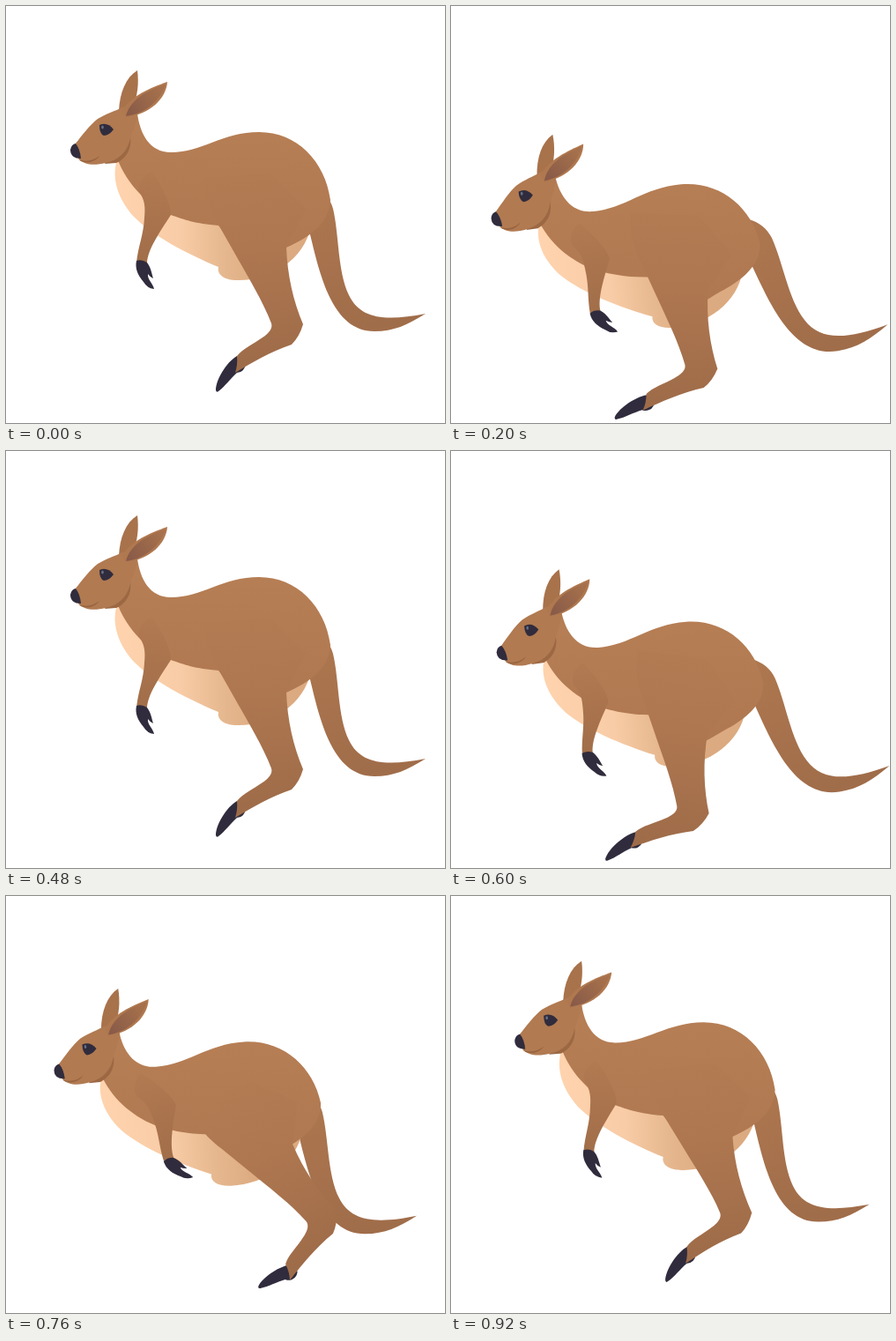
An HTML page that plays this animation: 498x473 px, repeating every 0.96 s.

```html
<!DOCTYPE html>
<html lang="en">
<head>
<meta charset="utf-8">
<title>Hopping kangaroo</title>
<style>
  html, body { margin: 0; width: 100%; height: 100%; overflow: hidden; background: #fff; }
  svg { display: block; width: 100vw; height: 100vh; }
</style>
</head>
<body>
<svg viewBox="0 0 498 473">
  <defs>
    <linearGradient id="coat" gradientUnits="userSpaceOnUse" x1="255" y1="143" x2="250" y2="300">
      <stop offset="0" stop-color="#b67e54"/><stop offset="1" stop-color="#ae7750"/>
    </linearGradient>
    <linearGradient id="thigh" gradientUnits="userSpaceOnUse" x1="285" y1="190" x2="300" y2="400">
      <stop offset="0" stop-color="#b37b52"/><stop offset=".4" stop-color="#ae7750"/><stop offset="1" stop-color="#9f6c49"/>
    </linearGradient>
    <linearGradient id="rear" gradientUnits="userSpaceOnUse" x1="360" y1="200" x2="410" y2="365">
      <stop offset="0" stop-color="#ae774f"/><stop offset="1" stop-color="#a06d4a"/>
    </linearGradient>
    <linearGradient id="limb" gradientUnits="userSpaceOnUse" x1="168" y1="190" x2="158" y2="285">
      <stop offset="0" stop-color="#b27a51"/><stop offset=".55" stop-color="#a9734d"/><stop offset="1" stop-color="#a26f4a"/>
    </linearGradient>
    <linearGradient id="cream" gradientUnits="userSpaceOnUse" x1="125" y1="0" x2="346" y2="0">
      <stop offset="0" stop-color="#fed3ae"/><stop offset=".33" stop-color="#f8cca6"/>
      <stop offset=".55" stop-color="#e6b88f"/><stop offset=".75" stop-color="#dcaa80"/>
    </linearGradient>
    <linearGradient id="inner" gradientUnits="userSpaceOnUse" x1="138" y1="122" x2="174" y2="94">
      <stop offset="0" stop-color="#885a48"/><stop offset="1" stop-color="#a5704b"/>
    </linearGradient>
  </defs>

  <g id="tail">
    <path fill="url(#rear)" d="M335 205L350 205C361 210 368 219 371 230C378 260 376 301 389 328C402 355 430 358 476 349C455 362 440 369 418 369C370 369 356 305 344 255L330 225Z"/>
  </g>
  <g id="body">
    <path fill="url(#cream)" d="M126 174C119 197 128 220 145 239C167 261 205 281 241 296C239 305 248 311 262 311C300 312 338 288 346 250L318 200L190 200Z"/>
    <path fill="url(#coat)" d="M127 175L125 165L130 120L149 122C152 145 163 166 187 166C222 166 246 143 287 143C330 143 362 176 368 220C367 246 345 262 318 274C310 278 304 282 297 284Q265 280 241 249C215 247 201 242 187 237C160 225 138 203 127 175Z"/>
  </g>
  <g id="leg">
    <path id="toe" fill="#302c3d" d="M262 397C250 404 238 424 238 436Q239 439 241 437C249 431 254 423 262 416A9.500 9.500 0 0 0 262 397Z"/>
    <path fill="url(#thigh)" d="M225 195C226 222 234 236 241 248L262 285C275 308 292 336 301 360C303 366 297 372 291 376C280 384 268 389 262 397Q263 407 260 416C280 404 300 392 324 384Q333 375 337 361C326 335 319 305 318 273L340 230L300 190Z"/>
  </g>
  <g id="arm">
    <path fill="url(#limb)" d="M165 188C154 194 149 203 151 211C158 220 158 230 157 240C156 260 150 272 148 291L160 291C161 276 174 257 187 237C188 228 178 205 165 188Z"/>
    <path id="hand" fill="#302c3d" d="M148 289Q154 287 160 291C164 296 165 302 167 309Q163 307 161 304C160 310 167 315 168 321Q160 320 156 313C150 306 146 298 148 289Z"/>
  </g>
  <g id="head">
    <path fill="#a8724b" d="M128 119C129 98 136 81 149 73C151 88 149 103 144 114Z"/>
    <path fill="#9c6844" d="M141 149C143 163 135 174 125 178L112 179L130 150Z"/>
    <path fill="#b17a51" d="M78 157C87 146 95 135 104 128C114 122 124 119 132 115L149 113L149 127L141 150C138 165 128 175 113 178C101 181 89 181 82 173Z"/>
    <path fill="#98643f" d="M82 174C91 177 98 176 106 170C101 177 92 179 85 176Z"/>
    <path fill="#b0784f" d="M132 118C143 101 164 93 183 86C182 104 164 123 136 126Z"/>
    <path fill="url(#inner)" d="M136 125C140 107 160 95 181 89C176 105 160 122 136 125Z"/>
    <path fill="#302c3d" d="M79 156Q84 162 85 173Q73 173 73 163Q74 157 79 156Z"/>
    <path fill="#302c3d" d="M106 135Q115 131 122 140Q117 147 111 147Q106 145 106 135Z"/>
    <ellipse cx="109.500" cy="137.500" rx="1.300" ry="2" fill="#667088"/>
  </g>
</svg>
<script>
const HOP = 480, STEP = 40;
const LAND = 160, LAUNCH = 200, STRETCH = 280;

// 0 at the top of the hop, 1 while crouched on the ground
function crouchAt(t) {
  if (t > LAUNCH) return ((HOP - t) / (HOP - LAUNCH)) ** 2.5;
  const u = Math.min(1, t / LAND);
  return u * u * (3 - 2 * u);
}

// 0 at the top of the hop, 1 with the limbs pushed furthest back
function kickAt(t) {
  return t < STRETCH ? (t / STRETCH) ** 1.15 : ((HOP - t) / (HOP - STRETCH)) ** 1.7;
}

// Moves a part by dx, dy and turns and scales it about its pivot
function pose(id, [x, y], dx, dy, turn, sx = 1, sy = 1) {
  document.getElementById(id).setAttribute("transform",
    `translate(${x + dx} ${y + dy}) scale(${sx} ${sy}) rotate(${turn}) translate(${-x} ${-y})`);
}

function draw(ms) {
  const t = Math.floor(ms / STEP) * STEP % HOP;
  const c = crouchAt(t), k = kickAt(t);
  const squash = 0.025 * (c + k);

  pose("body", [127, 175], -19.6 * c - 9.2 * k, 72 * c, -4 * c - 1.9 * k, 1 + squash / 2, 1 - squash);
  pose("head", [114, 140], -22.5 * c - 9.7 * k, 74 * c + 1.4 * k, -3.5 * c - 0.5 * k);
  pose("tail", [476, 349], 37 * c - 26 * k, 4 * c + 12 * k, 5.5 * k - 14 * c, 1 + 0.07 * c - 0.02 * k);
  pose("leg", [319, 369], 81 * k - 91 * c, 67 * c - 27 * k, 28 * c - 33 * k, 1 + 0.05 * c * (1 - k / 2));
  pose("toe", [262, 407], 0, 0, 54 * k - 18 * c);
  pose("arm", [154, 290], 37.5 * k - 16 * c, 72 * c - 22 * k, -24.4 * k);
  pose("hand", [154, 290], 0, 0, -6 * c - 3 * k);
}

const start = performance.now();
function tick() {
  draw(performance.now() - start);
  requestAnimationFrame(tick);
}
draw(0);
requestAnimationFrame(tick);
</script>
</body>
</html>
```
